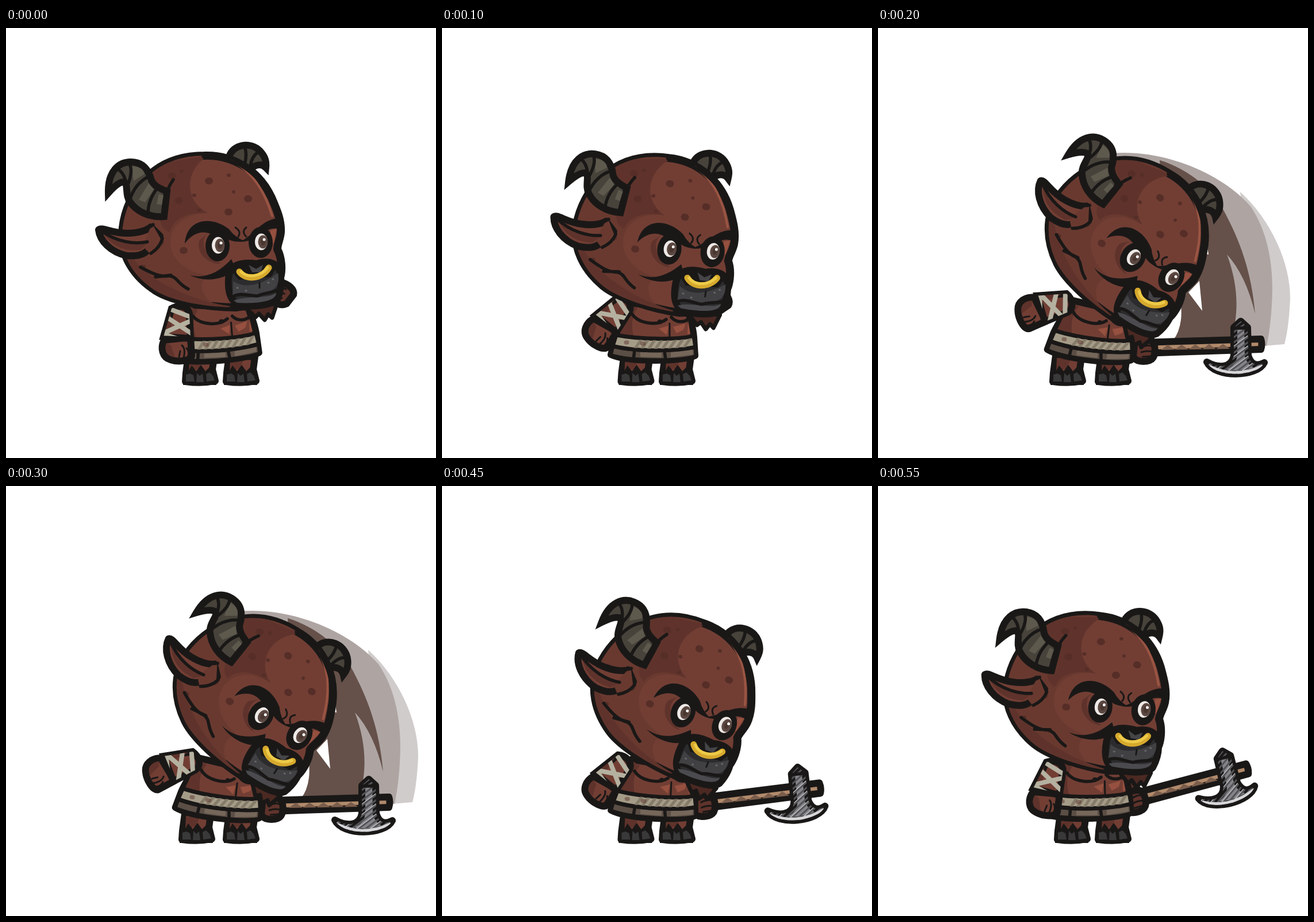
An HTML page for the animation above (600 ms loop, 748x748 px).

```html
<!DOCTYPE html>
<html lang="en">
<head>
<meta charset="utf-8">
<title>Minotaur slash</title>
<style>
  html, body { margin: 0; width: 100%; height: 100%; overflow: hidden; background: #fff; }
  svg { display: block; width: 100vw; height: 100vh; }
  path { stroke-linejoin: round; stroke-linecap: round; }
  .ink { stroke: #1a1817; stroke-width: 12; }
  .bold { stroke-width: 14; }
  .thin { stroke-width: 7; }
  .tip { stroke-linejoin: miter; stroke-miterlimit: 6; }
  .line { fill: none; stroke: #1a1817; stroke-width: 5.5; }
  .fine { stroke-width: 3; }
  .black { fill: #1a1817; }
  .skin { fill: #723e34; }
  .mid { fill: #69392f; }
  .shade { fill: #5f332b; }
  .glow { fill: #96503f; }
  .horn { fill: #47433b; }
  .hoof { fill: #39393a; }
  .spots { fill: none; stroke: #562e27; }
</style>
</head>
<body>
<svg viewBox="0 0 748 748">
  <defs id="clips"></defs>

  <g id="swoosh">
    <path fill="#d0cccb" d="M630 285C685 335 717 410 717 470Q715 520 707 550L660 554Z"/>
    <path fill="#aea5a3" d="M405 218C500 210 600 255 648 310C675 350 686 400 686 455Q685 510 676 553L540 545V300Z"/>
    <path fill="#65514a" d="M490 230C540 245 580 280 600 315C630 370 650 425 656 497Q640 430 607 394C628 450 628 500 613 546L513 544Q535 515 524 462L500 400Z"/>
    <path fill="#fff" d="M540 460L564 492L559 440ZM568 350L575 394L566 392Z"/>
  </g>

  <g id="reach" fill="none">
    <path stroke="#1a1817" stroke-width="42"/>
    <path stroke="#5f332b" stroke-width="24"/>
  </g>
  <g id="axe">
    <path class="ink" fill="#b18a6b" d="M460 547L666 541Q669 550 666 559L460 566Z"/>
    <path id="carving" fill="#7b5e4c"/>
    <path id="steel" class="ink" fill="#858589" d="M572 581C592 592 615 592 619 570V521L631 510L643 521L644 570C650 588 660 588 672 582C660 608 585 609 572 581Z"/>
    <g clip-path="url(#in-steel)" fill="none">
      <path id="gleam" stroke="#c6c6ca" stroke-width="4"/>
      <path id="scratches" stroke="#535357" stroke-width="3"/>
      <path stroke="#d6d6d9" stroke-width="5" d="M578 589Q622 610 668 588"/>
    </g>
    <path class="line" d="M618 522H644"/>
    <path class="ink shade" d="M446 551C452 541 470 540 478 546C484 556 483 574 473 578C462 582 447 580 444 571Z"/>
    <path class="line fine" d="M458 555Q470 550 478 554M458 564Q470 560 479 564M460 572L474 571"/>
  </g>

  <g id="leftLeg">
    <path class="ink skin" d="M317 570L313 600L312 615Q340 619 364 614L359 594L362 572Z"/>
    <path class="shade" d="M319 574h25l-8 18-18 5z"/>
    <path class="black" d="M309 594l9 2 5-9 8 10 8-11 8 11 8-8 8 8 3 24h-58z"/>
    <path class="hoof" d="M313 603l7-2 6 3 2 11h-15zM332 600l5 5 5-4 2 15h-13zM348 602l6-3 6 6 3 8-14 2z"/>
  </g>
  <g id="rightLeg" transform="translate(71 0)"></g>

  <g id="body">
    <path class="ink skin" d="M325 478C317 505 305 525 301 540L294 568C325 582 420 580 440 570L438 538C437 520 432 510 428 490Z"/>
    <path class="shade" d="M325 480L305 538L335 542C328 520 330 500 340 488Z"/>
    <path class="glow" d="M377 523L394 518L391 534ZM402 520L424 514L420 525L408 531ZM428 508L432 532L427 532Z"/>
    <path class="line" d="M331 498C342 514 374 519 390 507M399 503C408 514 422 512 429 506"/>
    <path class="line fine" d="M396 514V536"/>
    <circle cx="379" cy="511" r="4" class="black"/>
    <path class="ink thin" fill="#5b4e45" d="M297 553C340 564 410 562 441 555L442 571C420 580 330 581 293 569Z"/>
    <path fill="#76675b" d="M345 564l37 1v8l-37-1zM398 564l38-5v9l-38 5z"/>
    <path class="line" d="M335 561L333 576M387 562L389 577"/>
    <path id="strap" class="ink thin" fill="#a59c88" d="M303 534C350 543 410 542 438 536L441 555C410 562 340 564 297 553Z"/>
    <path id="weave" clip-path="url(#in-strap)" stroke="#857b69" stroke-width="5"/>
    <path class="spots" stroke-width="7" d="M320 547h2M348 549h3" opacity=".45"/>
    <path class="line" d="M303 534C350 543 410 542 438 536M441 555C410 562 340 564 297 553"/>
  </g>

  <g id="leftArm">
    <path class="ink skin" d="M275 543C268 557 272 573 286 577C300 582 321 579 323 570L321 538Z"/>
    <path class="shade" d="M279 548C274 562 282 571 294 573L287 552Z"/>
    <path class="line fine" d="M306 552Q313 558 309 574M314 557Q320 562 316 575M303 562L301 572"/>
    <path id="sleeve" class="ink skin tip" d="M288 488C300 481 316 483 319 497L321 540L274 537Z"/>
    <g clip-path="url(#in-sleeve)" fill="none" stroke="#b5b1a0" stroke-width="8">
      <path class="shade" stroke="none" d="M285 484L270 540H289Z"/>
      <path d="M288 490L322 503M284 506L322 531M280 528L320 510M276 533L300 541"/>
    </g>
    <path class="line" d="M274 538L321 540"/>
  </g>

  <g id="head">
    <path class="ink thin" fill="#4b2922" d="M412 482L426 495L434 503L440 497L450 508L456 498L463 504L471 480Z"/>
    <path class="ink horn tip" d="M388 224C395 202 425 197 442 214C452 225 453 233 452 243C446 237 438 237 431 241L410 260Z"/>
    <path class="line" d="M415 206Q420 220 415 238M439 216Q428 222 425 240"/>

    <path id="skull" class="ink bold skin" d="M345 222C397 220 441 250 462 295C472 318 479 335 478 355C477 368 472 375 472 385C480 400 480 420 478 430C470 460 450 480 400 486C350 486 290 475 262 458C225 435 201 400 202 360C204 300 245 222 345 222Z"/>
    <g clip-path="url(#in-skull)">
      <path class="mid" d="M345 222C305 255 315 305 352 322C310 322 285 345 286 375C288 405 315 425 350 430C330 450 345 475 380 490H190V222Z"/>
      <path class="shade" d="M350 222C305 255 315 305 352 322C310 320 290 335 285 355C265 350 262 320 275 285L240 240ZM200 370C225 425 300 470 390 484L380 495H240L190 420Z"/>
      <path class="shade" d="M352 355C335 370 345 398 375 410C350 412 330 390 336 370Z"/>
      <path fill="none" stroke="#9a5543" stroke-width="4" d="M392 231C430 250 450 285 463 327"/>
      <path class="glow" d="M460 352L471 349L466 374L461 378Z"/>
      <path class="spots" stroke-width="12" d="M352 266h2M420 297h2M386 320h2M300 300h2M308 387h2M267 372h2M288 257h2"/>
      <path class="spots" stroke-width="6" d="M387 256h1M327 291h1M335 317h1M396 285h0M305 249h1M237 415h3"/>
      <path fill="none" stroke="#1a1817" stroke-width="10" d="M345 222C397 220 441 250 462 295C472 318 479 335 478 355C477 368 472 375 472 385"/>
    </g>

    <path class="ink skin" d="M245 388C237 396 222 397 210 396C182 390 163 370 161 351C166 345 185 358 212 357C230 357 245 352 252 346L268 362Z"/>
    <path class="mid" d="M254 340L272 372L250 392L238 380Z"/>
    <path class="shade" d="M172 360C190 369 220 373 245 374L235 386C205 390 184 378 172 360Z"/>
    <path class="line" d="M164 352C195 374 225 376 246 372M256 342Q242 354 218 357M272 366Q268 382 252 392"/>

    <path class="ink horn tip" d="M178 287C177 248 197 233 217 233C240 233 249 250 253 265C258 276 270 280 280 284L275 328C250 330 228 320 216 303C206 290 214 270 204 268C196 268 186 278 178 287Z"/>
    <path fill="#5e594d" d="M218 241Q238 240 241 254L222 266ZM248 270L257 281L242 303L231 299ZM266 289L274 291L271 308L262 306Z"/>
    <path class="line" d="M190 243Q206 250 209 271M213 234Q222 245 213 270M249 258Q224 270 215 300M264 278Q247 298 247 323M291 264Q272 290 276 328"/>

    <path class="line" d="M234 416C254 427 269 434 284 431C300 434 296 443 317 454M260 433L287 430"/>
    <path class="black" d="M320 430C345 436 368 428 392 402L400 420C376 440 345 442 320 430Z"/>
    <path class="line fine" d="M399 347Q410 354 404 363M418 347Q409 354 418 363"/>
    <path class="black" d="M311 375C314 331 358 326 388 350Q398 364 416 371Q395 374 384 366L374 370C352 350 330 350 311 375Z"/>
    <path class="black" d="M406 372C432 362 444 329 480 331L481 352C462 343 450 354 438 364Q422 372 406 372Z"/>
    <g id="eyes"></g>

    <path class="ink" fill="#2c2c2e" d="M387 436C388 413 406 406 436 410C462 402 477 412 478 433C480 450 476 462 473 470C465 483 425 486 405 481C389 475 386 455 387 436Z"/>
    <path fill="#414144" d="M395 440C420 458 455 440 473 426C477 445 470 456 450 461C430 470 410 460 394 465Z"/>
    <path fill="#4b4b4f" d="M396 474C418 465 455 472 470 461C470 475 440 480 402 478Z"/>
    <path class="line" d="M393 468C407 459 422 466 438 466C452 459 463 462 475 454"/>
    <path class="line fine" d="M441 443V452"/>
    <path class="black" d="M394 425C398 405 425 404 438 414C450 403 467 402 471 416L461 433L405 438Z"/>
    <path fill="#454548" d="M422 412l13 7 12-7-4 13h-15z"/>
    <path fill="none" stroke="#d6a92d" stroke-width="11" d="M406 424C418 440 446 436 457 417"/>
    <path fill="none" stroke="#edca48" stroke-width="5" d="M409 424C421 436 444 432 455 417"/>
    <path fill="none" stroke="#66666a" stroke-width="3" d="M402 452h1M417 457h1M456 443h1M464 437h1"/>
  </g>
</svg>
<script>
const el = id => document.getElementById(id);
const place = (id, x, y, angle, px, py) =>
  el(id).setAttribute('transform', `translate(${x} ${y}) rotate(${angle}) translate(${-px} ${-py})`);
const setPath = (id, d) => el(id).setAttribute('d', d);
const mix = (a, b, k) => a + (b - a) * k;
const clamp = k => Math.min(1, Math.max(0, k));
const smooth = k => clamp(k) ** 2 * (3 - 2 * clamp(k));

for (const id of ['skull', 'steel', 'strap', 'sleeve'])
  el('clips').innerHTML += `<clipPath id="in-${id}"><path d="${el(id).getAttribute('d')}"/></clipPath>`;

el('rightLeg').innerHTML = el('leftLeg').innerHTML;
setPath('carving', 'M492 560' + 'l12 -9 12 8.6'.repeat(5) + 'z');
setPath('weave', 'M330 566' + 'l18 -26 m-6 26'.repeat(8));
setPath('scratches', 'M575 535' + 'l100 -75 m-100 84'.repeat(15));
setPath('gleam', 'M575 588' + 'l100 -75 m-100 93'.repeat(7));

const eye = (x, y) => {
  const oval = (dx, dy, rx, ry, fill) =>
    `<ellipse cx="${x + dx}" cy="${y + dy}" rx="${rx}" ry="${ry}" fill="${fill}"/>`;
  return oval(-1, 1, 21, 27, '#1a1817') + oval(0, 0, 11, 14.5, '#eee9e6') +
    oval(3, 0, 8.5, 11.5, '#5b4741') + oval(3, 0, 4, 6, '#493730') + oval(5, -4, 2.5, 2.5, '#fff');
};
el('eyes').innerHTML = eye(369, 378) + eye(444, 372);

const STRIKE = 200, LOOP = 600, STEP = 50;

function draw(now) {
  const time = Math.floor(now % LOOP / STEP) * STEP;
  const wind = clamp(time / STRIKE);
  const rest = clamp((time - STRIKE) / (LOOP - STRIKE));
  const back = smooth((time - 325) / 335);
  const lean = wind ** 2 - back;
  const swing = wind - back - .18 * Math.sin(Math.PI * rest ** 1.5);
  const sway = Math.sin(Math.PI * wind);

  place('head', 372 + 90 * lean + 9 * sway, 350.5 + 26.5 * lean, 32 * lean, 372, 350.5);
  place('body', 372, 570, -4.5 + 11 * lean + 1.7 * sway, 372, 570);
  place('leftArm', 303 + 28 * swing, 490 - 34 * swing + 21 * swing ** 2, 70 * swing, 303, 490);
  place('leftLeg', -8 * swing ** 4, 0, 0, 0, 0);

  const chop = wind ** 3;
  const handX = mix(477, 462, chop) - 23 * back;
  const handY = mix(467, 556, chop) - 16 * back;
  place('axe', handX, handY, mix(-148, 0, chop) - 17.5 * back, 462, 556);
  for (const part of el('reach').children) part.setAttribute('d', `M424 515L${handX} ${handY}`);
  el('reach').style.display = time < STRIKE ? 'none' : '';
  el('swoosh').style.display = time >= STRIKE && time <= 300 ? '' : 'none';
  requestAnimationFrame(draw);
}
draw(performance.now());
</script>
</body>
</html>
```
